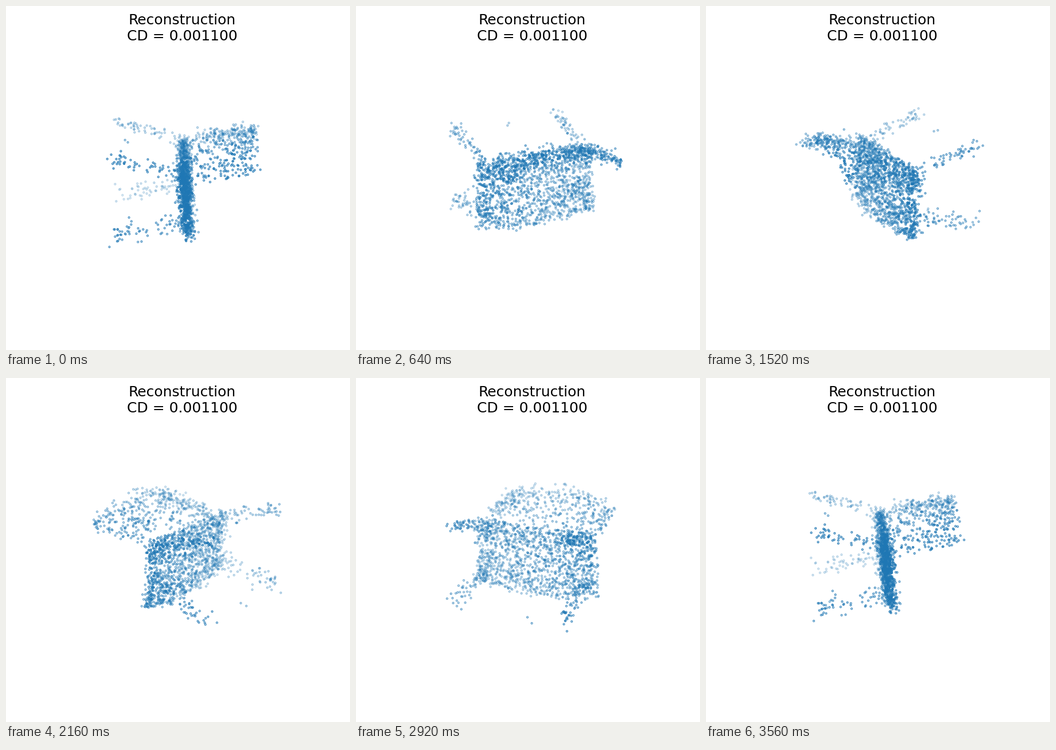
Recreate the animation shown at these times as a matplotlib script. Size 600x600 px, loop 3.6 s.

```python
import numpy as np
import matplotlib.pyplot as plt
from matplotlib.animation import FuncAnimation

FRAMES = 90
ELEV = np.radians(20)
DIST = 10          # camera distance in scene units
SCALE = 250        # pixels per scene unit at the centre
CENTER = np.array([313.7, 297.0])
BLUE = (0x1F / 255, 0x77 / 255, 0xB4 / 255)

rng = np.random.default_rng(7)


def edge_heavy(n, k):
    """Values in -1..1, denser towards both ends."""
    return np.sin(k * rng.uniform(-1, 1, n)) / np.sin(k)


def jitter(n, *sigma):
    return rng.normal(0, 1, (n, 3)) * sigma


def seat(n):
    u = edge_heavy(n, 1.0)
    v = (edge_heavy(n, 0.9) + 1) / 2
    front = -0.30 - 0.05 * (1 - u**2)
    z = front + v * (0.165 - front)
    y = -0.009 - 0.068 * z
    return np.c_[0.445 * u, y, z] + jitter(n, 0.014, 0.023, 0.014)


def backrest(n):
    turn = np.radians(75) * rng.uniform(-1, 1, n)
    y = 0.02 + 0.47 * rng.random(n) ** 0.75
    x = 0.42 * np.sin(turn) / np.sin(np.radians(75))
    z = 0.125 + (0.06 + 0.24 * y) * np.cos(turn)
    return np.c_[x, y, z] + jitter(n, 0.014, 0.016, 0.028)


def leg(n, side, z0, z1, spread):
    t = rng.random(n) ** 0.8
    x = side * (0.37 + 0.04 * t)
    return (np.c_[x, -0.03 - 0.48 * t, z0 + (z1 - z0) * t]
            + jitter(n, 0.026, 0.01, spread))


strays = np.array([[0.01, -0.42, 0.27], [0.03, -0.40, 0.26],
                   [0.10, -0.40, -0.35], [0.14, -0.42, -0.38]])

points = np.vstack(
    [seat(1400), backrest(425), strays]
    + [leg(55, side, 0.15, 0.27, 0.024) for side in (-1, 1)]
    + [leg(55, side, -0.20, -0.29, 0.036) for side in (-1, 1)])


def project(azim):
    """Pixel positions and nearness of all points, far ones first."""
    x, y, z = points.T
    right = -np.sin(azim) * x + np.cos(azim) * y
    ahead = np.cos(azim) * x + np.sin(azim) * y
    up = np.cos(ELEV) * z - np.sin(ELEV) * ahead
    near = np.cos(ELEV) * ahead + np.sin(ELEV) * z
    zoom = SCALE / (1 - near / DIST)
    pos = CENTER + np.c_[right * zoom, -up * zoom]
    order = np.argsort(near)
    return pos[order], near[order]


fig = plt.figure(figsize=(4, 4), dpi=150, facecolor="white")
ax = fig.add_axes([0, 0, 1, 1])
ax.set(xlim=(0, 600), ylim=(600, 0))
ax.axis("off")
ax.text(307.5, 59.5, "Reconstruction\nCD = 0.001100", family="DejaVu Sans",
        size=12, ha="center", va="baseline")

cloud = ax.scatter(*project(0)[0].T, s=1, marker=".", color=[BLUE],
                   linewidths=1.5, edgecolors="face")


def update(i):
    pos, near = project(2 * np.pi * i / FRAMES)
    alpha = 0.3 + 0.7 * (near - near[0]) / (near[-1] - near[0])
    rgba = np.c_[np.tile(BLUE, (len(alpha), 1)), alpha]
    cloud.set_offsets(pos)
    cloud.set_facecolor(rgba)
    cloud.set_edgecolor(rgba)
    return cloud,


anim = FuncAnimation(fig, update, frames=FRAMES, interval=40,
                     repeat=True, repeat_delay=0)
plt.show()
```
